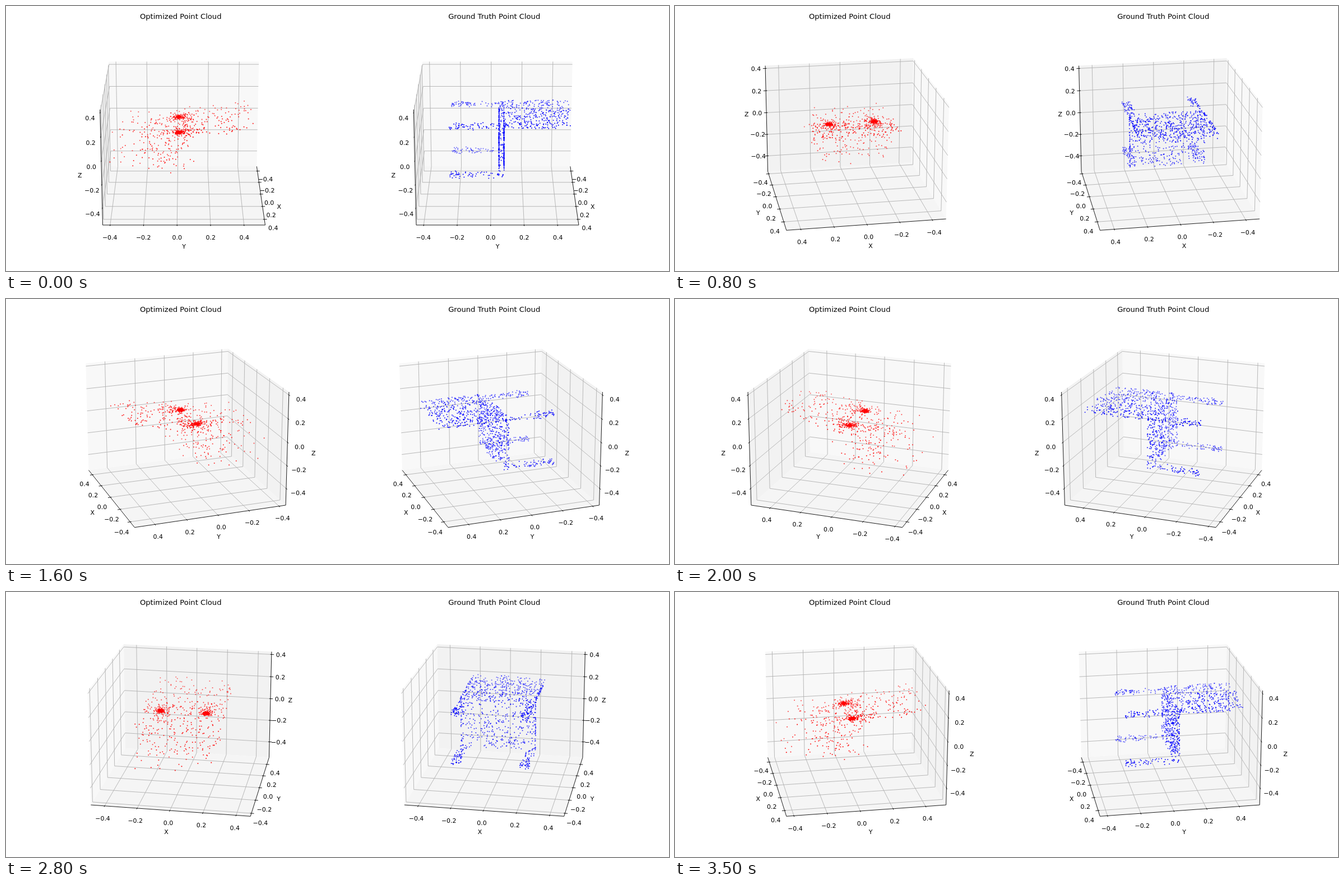
An HTML page with a canvas that plays this animation: 1183x473 px, repeating every 3.6 s.

```html
<!DOCTYPE html>
<html lang="en">
<head>
<meta charset="utf-8">
<title>Point clouds</title>
<style>
html, body { margin: 0; width: 100%; height: 100%; overflow: hidden; background: #fff; }
canvas { display: block; }
</style>
</head>
<body>
<canvas id="stage" width="1183" height="473"></canvas>
<script>
const ctx = document.getElementById('stage').getContext('2d');
const FONT = '"DejaVu Sans", Verdana, sans-serif';
const TICK_PX = 10.95, TITLE_PX = 13.14;
const HALF = [0.5953, 0.5953, 0.4465];     // half size of the box in world units
const SCALE = [1.226, 1.226, 0.9195];      // world units per data unit
const MID = [0, 0.041, -0.061];            // data value at the box centre
const DELTA = HALF.map(h => h * 0.16);
const PANES = ['#f8f8f8', '#f2f2f2', '#f5f5f5'];
const TICKS = [-0.4, -0.2, 0, 0.2, 0.4];
const ZOOM = 2336.6, DIST = 10, CENTER_Y = 239.2;
const ELEV = 20 * Math.PI / 180, CE = Math.cos(ELEV), SE = Math.sin(ELEV);

let seed = 7;
function rnd() {
  seed = (seed + 0x6D2B79F5) | 0;
  let t = Math.imul(seed ^ seed >>> 15, 1 | seed);
  t = t + Math.imul(t ^ t >>> 7, 61 | t) ^ t;
  return ((t ^ t >>> 14) >>> 0) / 4294967296;
}
const span = (a, b) => a + (b - a) * rnd();
const gauss = (m, s) => m + s * Math.sqrt(-2 * Math.log(1 - rnd())) * Math.cos(2 * Math.PI * rnd());
const pick = (a, b) => rnd() < 0.5 ? a : b;
const toWorld = (v, i) => (v - MID[i]) * SCALE[i];

function add(cloud, count, make) {
  for (let n = 0; n < count; n++) cloud.push(make().map(toWorld));
}

// A chair lying on its back: seat, backrest and four legs
function makeChair() {
  const c = [];
  add(c, 330, () => [span(-0.235, 0.235), pick(0.05, 0.081), span(-0.27, 0.18)]);
  add(c, 50, () => [pick(-0.235, 0.235), span(0.05, 0.081), span(-0.27, 0.18)]);
  add(c, 340, () => [span(-0.235, 0.235), span(0.05, 0.495), pick(0.148, 0.186)]);
  add(c, 60, () => [pick(-0.235, 0.235), span(0.07, 0.495), span(0.148, 0.186)]);
  for (const x of [-0.212, 0.212]) for (const z of [-0.256, 0.162])
    add(c, 56, () => [x + span(-0.027, 0.027), -0.25 + 0.3 * rnd() ** 1.5, z + span(-0.021, 0.021)]);
  return c;
}

// A loose blurred version with two dense knots
function makeRough() {
  const c = [];
  for (const x of [-0.143, 0.143]) {
    add(c, 110, () => [gauss(x, 0.012), gauss(0.011, 0.014), gauss(0.075, 0.006)]);
    add(c, 45, () => [gauss(x, 0.035), gauss(0.02, 0.045), gauss(0.078, 0.014)]);
  }
  add(c, 150, () => {
    const reach = 0.43 * rnd() ** 1.5;
    return [span(-0.26, 0.26), 0.04 + reach, gauss(0.085 + 0.2 * reach, 0.016)];
  });
  add(c, 60, () => [span(-0.26, 0.26), 0.04 - 0.4 * rnd() ** 1.5, gauss(0.07, 0.02)]);
  add(c, 140, () => [span(-0.26, 0.26), gauss(-0.08, 0.08), span(-0.27, 0.07)]);
  add(c, 18, () => [span(-0.26, 0.26), span(-0.42, -0.2), span(-0.27, 0.05)]);
  return c;
}

const plots = [
  { title: 'Optimized Point Cloud', x: 311.7, color: '#f00', cloud: makeRough() },
  { title: 'Ground Truth Point Cloud', x: 871.2, color: '#00f', cloud: makeChair() }
];

function drawPlot(plot, azim) {
  const ca = Math.cos(azim), sa = Math.sin(azim), centerX = plot.x + 5.8;
  const far = [ca >= 0 ? -1 : 1, sa >= 0 ? -1 : 1, -1].map((s, i) => s * HALF[i]);
  const near = far.map(v => -v);

  const project = ([x, y, z]) => {
    const out = ca * x + sa * y;
    const d = DIST - CE * out - SE * z;
    return [centerX + ZOOM * (ca * y - sa * x) / d, CENTER_Y - ZOOM * (CE * z - SE * out) / d, d];
  };
  const trace = points => {
    ctx.beginPath();
    points.forEach(p => ctx.lineTo(...project(p).slice(0, 2)));
  };
  const line = (color, points) => {
    ctx.strokeStyle = color;
    trace(points);
    ctx.stroke();
  };
  const put = (base, changes) => {
    const p = base.slice();
    for (const i in changes) p[i] = changes[i];
    return p;
  };
  const pushOut = (p, axis, amount) =>
    p.map((v, i) => i === axis ? v : v + Math.sign(v) * amount * DELTA[i]);
  const text = (str, p, drop) => {
    const [x, y] = project(p);
    ctx.fillText(str, x, y + drop * TICK_PX);
  };

  for (let i = 0; i < 3; i++) {
    const j = (i + 1) % 3, k = (i + 2) % 3;
    ctx.fillStyle = PANES[i];
    trace([far, put(far, { [j]: near[j] }), put(near, { [i]: far[i] }), put(far, { [k]: near[k] })]);
    ctx.fill();
  }

  ctx.lineWidth = 0.88;
  ctx.font = TICK_PX + 'px ' + FONT;
  ctx.textAlign = 'center';
  for (let i = 0; i < 3; i++) {
    const j = (i + 1) % 3, k = (i + 2) % 3;
    const side = i === 0 ? 1 : 0;          // direction of the tick marks
    const edge = put(far, { [side]: near[side] });
    for (const v of TICKS) {
      const at = { [i]: toWorld(v, i) };
      line('#b0b0b0', [put(far, { ...at, [j]: near[j] }), put(far, at), put(far, { ...at, [k]: near[k] })]);
    }
    line('#000', [edge, put(edge, { [i]: near[i] })]);
    ctx.fillStyle = '#000';
    for (const v of TICKS) {
      const p = put(edge, { [i]: toWorld(v, i) });
      const step = Math.sign(p[side]) * DELTA[side];
      line('#000', [put(p, { [side]: p[side] + 0.2 * step }), put(p, { [side]: p[side] - 0.1 * step })]);
      text(v.toFixed(1).replace('-', '\u2212'), pushOut(p, i, 0.699), 0.76);
    }
    text('XYZ'[i], pushOut(put(edge, { [i]: 0 }), i, 1.52), 0.26);
  }

  const dots = plot.cloud.map(project).sort((a, b) => b[2] - a[2]);
  const back = dots[0][2], front = dots[dots.length - 1][2];
  ctx.fillStyle = plot.color;
  for (const [x, y, d] of dots) {
    ctx.globalAlpha = 1 - 0.45 * (d - front) / (back - front);
    ctx.beginPath();
    ctx.arc(x, y, 1, 0, 7);
    ctx.fill();
  }
  ctx.globalAlpha = 1;

  ctx.fillStyle = '#000';
  ctx.font = TITLE_PX + 'px ' + FONT;
  ctx.fillText(plot.title, plot.x, 22.5);
}

function frame() {
  const step = Math.floor(performance.now() % 3600 / 100);
  ctx.fillStyle = '#fff';
  ctx.fillRect(0, 0, 1183, 473);
  for (const plot of plots) drawPlot(plot, step * Math.PI / 18);
  requestAnimationFrame(frame);
}
frame();
</script>
</body>
</html>
```
